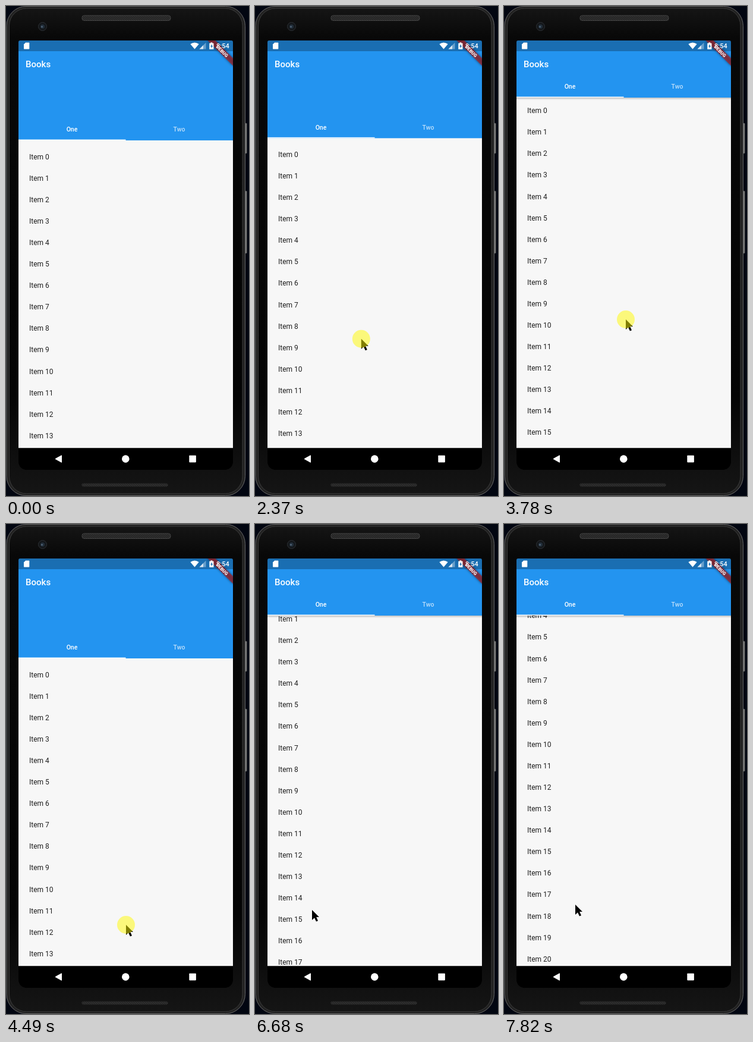
Recreate the animation shown at these times as an HTML page. Size 409x824 px, loop 8 s.

```html
<!DOCTYPE html>
<html lang="en">
<head>
<meta charset="utf-8">
<title>Books</title>
<style>
  html, body { margin: 0; width: 100%; height: 100%; overflow: hidden; background: #020611; }
  svg { display: block; width: 409px; height: 824px; }
  text { font-family: Roboto, "Open Sans", sans-serif; }
  .mid { text-anchor: middle; }
  .tab { font-size: 10.5px; font-weight: 500; fill: #fff; }
  #items text { font-size: 12.03px; fill: #212121; }
</style>
</head>
<body>
<svg viewBox="0 0 409 824">
  <defs>
    <clipPath id="screen"><path d="M21 61Q21 58 24 58H379Q382 58 382 61V764Q382 780 366 780H37Q21 780 21 764Z"/></clipPath>
    <clipPath id="page"><rect x="21" y="76" width="361" height="667.5"/></clipPath>
    <linearGradient id="glass" x1="0" x2="0" y1="0" y2="1">
      <stop offset="0" stop-color="#151515"/><stop offset=".06" stop-color="#080808"/>
      <stop offset=".8" stop-color="#040404"/><stop offset="1" stop-color="#151515"/>
    </linearGradient>
    <linearGradient id="shade" x1="0" x2="0" y1="0" y2="1">
      <stop offset="0" stop-color="#000" stop-opacity=".22"/><stop offset="1" stop-color="#000" stop-opacity="0"/>
    </linearGradient>
    <pattern id="mesh" width="3" height="3" patternUnits="userSpaceOnUse">
      <rect width="3" height="3" fill="#1c1c1c"/><path d="M0 3L3 0" stroke="#505050" stroke-width=".8"/>
    </pattern>
    <filter id="blur" x="-20%" y="-80%" width="140%" height="260%"><feGaussianBlur stdDeviation="2.2"/></filter>
  </defs>

  <!-- phone body -->
  <g fill="#777" stroke="#3a3a3a" stroke-width=".6">
    <rect x="402" y="197" width="3.500" height="51" rx="1.2"/>
    <rect x="402" y="311" width="3.500" height="105" rx="1.2"/>
  </g>
  <rect x="1" y=".5" width="401.500" height="823" rx="33" fill="#222" stroke="#686868"/>
  <rect x="5.500" y="4" width="392.500" height="816" rx="29" fill="url(#glass)" stroke="#3a3a3a"/>
  <rect x="128" y="16" width="149" height="8.500" rx="3.500" fill="url(#mesh)" stroke="#444"/>
  <rect x="127.500" y="803" width="145" height="5" rx="2.500" fill="url(#mesh)" stroke="#222"/>
  <circle cx="61.500" cy="34.500" r="7" fill="#14171a" stroke="#2d3135"/>
  <circle cx="61.500" cy="34.500" r="3.600" fill="#222e3a"/>
  <circle cx="60.500" cy="35" r="1.400" fill="#55687c"/>

  <g clip-path="url(#screen)">
    <rect x="21" y="58" width="361" height="722"/>
    <g clip-path="url(#page)">
      <rect x="21" y="76" width="361" height="668" fill="#f7f7f7"/>
      <g id="items"></g>
    </g>

    <!-- header -->
    <rect id="bar" x="21" y="58" width="361" height="168" fill="#2394f0"/>
    <g id="tabs">
      <rect id="shadow" x="21" y="226" width="361" height="4" fill="url(#shade)"/>
      <text class="tab mid" x="111" y="211.300">One</text>
      <text class="tab mid" x="291.500" y="211.300" fill-opacity=".7">Two</text>
      <rect x="21" y="224.500" width="180.500" height="1.500" fill="#fff"/>
    </g>
    <text x="33" y="102.800" font-size="15.040" font-weight="500" fill="#fff">Books</text>
    <rect x="21" y="58" width="361" height="18" fill="#000" fill-opacity=".26"/>

    <g transform="translate(382 58) rotate(45)">
      <rect x="-30" y="21" width="60" height="9" fill-opacity=".5" filter="url(#blur)"/>
      <rect x="-30" y="21" width="60" height="9" fill="#b71c1c" fill-opacity=".63"/>
      <text class="mid" y="28.300" font-size="7.670" font-weight="900" fill="#fff">DEBUG</text>
    </g>

    <!-- status icons -->
    <g fill="#fff">
      <path d="M33 61.500H38.500Q39.300 61.500 39.300 62.300V71.700Q39.300 72.500 38.500 72.500H30.800Q30 72.500 30 71.700V64.500Z"/>
      <path d="M310.300 64Q317.500 58.800 324.700 64L317.500 72.500Z"/>
      <path d="M336.500 61.500V72.500H325.500Z" fill-opacity=".35"/>
      <path d="M332 66V72.500H325.500Z" fill-opacity=".75"/>
      <path d="M344.500 61.300H347.300V62.500H349.500V72.700H342.300V62.500H344.500Z"/>
      <path d="M346.700 64L344 68.200H345.600V71.300L348.100 67H346.700Z" fill="#1c6fb4"/>
      <text x="354" y="71.200" font-size="11" font-weight="500">8:54</text>
    </g>

    <!-- navigation bar -->
    <rect x="21" y="743.500" width="361" height="37"/>
    <g fill="#fff">
      <path d="M83 761.600L93.500 755.800V767.400Z" stroke="#fff" stroke-linejoin="round"/>
      <circle cx="201.300" cy="761.600" r="6.300"/>
      <rect x="308.300" y="755.800" width="11.600" height="11.600" rx=".8"/>
    </g>
  </g>

  <g id="cursor">
    <path d="M0 0V17L4 13.200L7 19.500L10 18.300L7.200 12H12Z"/>
    <circle id="press" r="15" fill="#fffa00" fill-opacity=".5"/>
  </g>
</svg>

<script>
const LOOP = 8000, STEP = 77.5, LAG = 80;
const ROW = 36.08, FOLD = 72, GRIP = 571.5, FLING = 243.6;
const el = id => document.getElementById(id);
const clamp = (v, lo, hi) => Math.min(hi, Math.max(lo, v));
const speedUp = u => u ** 1.5;
const slowDown = (u, power = 1.5) => 1 - (1 - u) ** power;
const even = u => u;

function progress(t, from, to) {
  const n = Math.round((to - from) / STEP);
  return Math.floor(clamp((t - from) / (to - from), 0, 1) * n + 0.05) / n;
}

// pointer strokes: start, end, where it arrives, pace
const entry = [336, 794];
const strokes = [
  [110, 880, 160, 357, slowDown],
  [970, 1200, 151, 351, even],
  [1200, 1810, 178, 588, even],
  [1980, 2910, 181, 483, speedUp],
  [2910, 3380, 200, 433, slowDown],
  [3460, 3780, 205, 527, speedUp],
  [3780, 4490, 202, 674, slowDown],
  [4800, 5270, 86, 655, even],
  [5500, 5730, 96, 649, even],
  [7430, 7820, 120, 640, even]
];

function pointer(t) {
  return strokes.reduce(([x, y], [from, to, toX, toY, pace]) => {
    const u = pace(progress(t, from, to));
    return [x + (toX - x) * u, y + (toY - y) * u];
  }, entry);
}

// the list trails the held pointer; the later fling runs out on its own
function scrollAt(t) {
  const drag = t < 1980 ? 0 : Math.max(0, GRIP - pointer(t - LAG)[1]);
  return drag + FLING * slowDown(progress(t, 6350, 7280), 1.875);
}

function draw(t) {
  const scroll = scrollAt(t), fold = Math.min(scroll, FOLD);
  const [x, y] = pointer(t);
  const pressed = (t >= 1890 && t < 4630) || (t >= 5880 && t < 6050);
  el('items').setAttribute('transform', `translate(0 ${-scroll})`);
  el('bar').setAttribute('height', 168 - fold);
  el('tabs').setAttribute('transform', `translate(0 ${-fold})`);
  el('shadow').setAttribute('opacity', clamp((scroll - FOLD) / 5, 0, 1));
  el('cursor').setAttribute('transform', `translate(${x} ${y})`);
  el('cursor').setAttribute('visibility', t >= 110 ? 'visible' : 'hidden');
  el('press').setAttribute('opacity', pressed ? 1 : 0);
}

el('items').innerHTML = Array.from({ length: 22 }, (_, i) =>
  `<text x="39" y="${257.7 + i * ROW}">Item ${i}</text>`).join('');

const start = performance.now();
function tick() {
  draw((performance.now() - start) % LOOP);
  requestAnimationFrame(tick);
}
tick();
</script>
</body>
</html>
```
